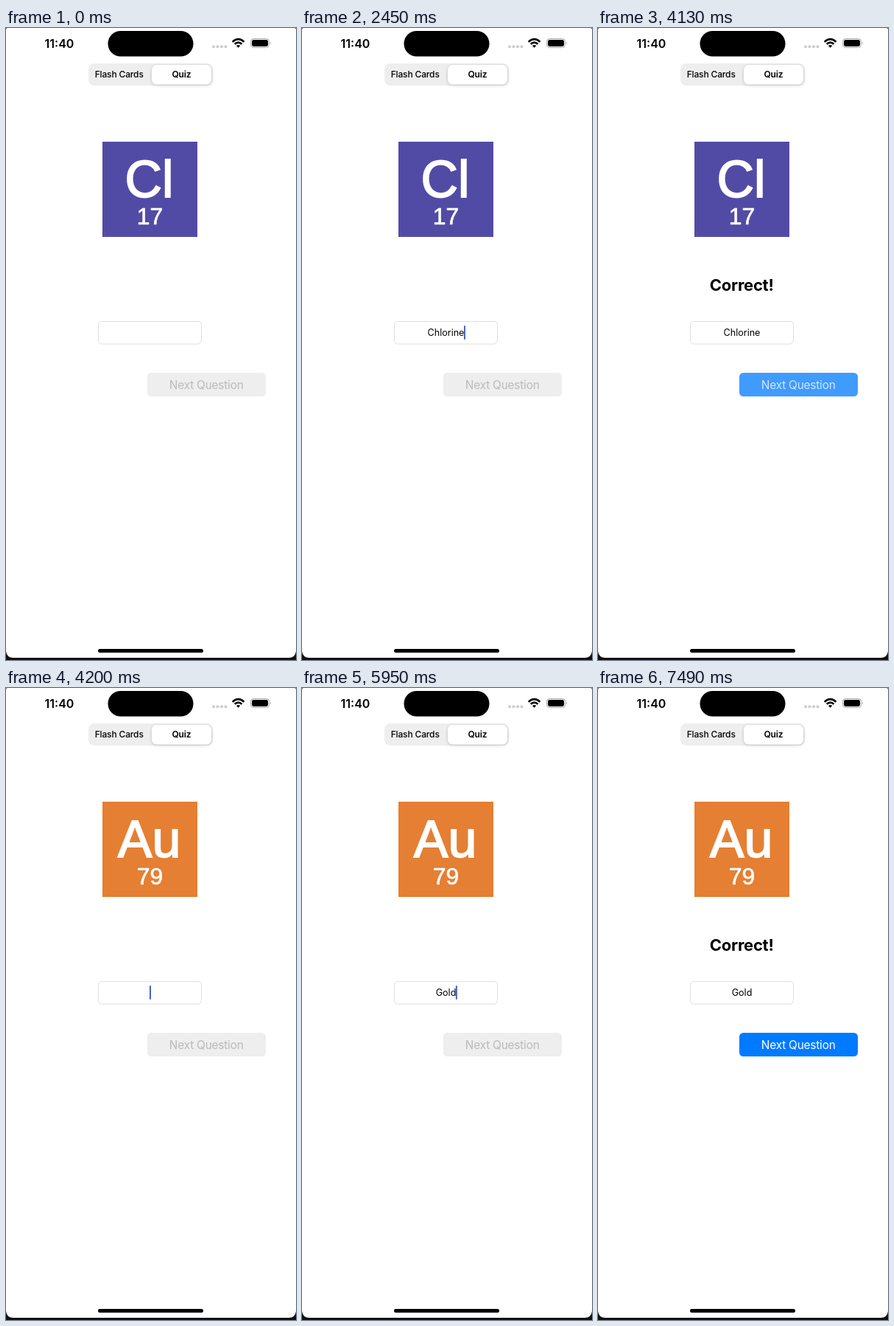
An HTML page for the animation above (8000 ms loop, 394 by 856 pixels).

```html
<!DOCTYPE html>
<html lang="en">
<head>
<meta charset="utf-8">
<title>Element quiz</title>
<style>
  html, body { margin: 0; width: 100%; height: 100%; overflow: hidden; background: #111; }
  svg { display: block; width: 394px; height: 856px; }
  text { font-family: Inter, sans-serif; text-anchor: middle; }
  .tile text {
    font-family: "Liberation Sans", Arial, sans-serif;
    fill: #fff; stroke: #fff;
  }
  #symbol { font-size: 70px; stroke-width: 1.8px; }
  #number { font-size: 32px; stroke-width: .7px; }
  .tab { font-size: 12px; letter-spacing: -.15px; }
</style>
</head>
<body>
<svg viewBox="0 0 394 856">
  <path d="M0 2Q0 0 2 0H392Q394 0 394 2V844Q393 853 384 853H10Q1 853 0 844Z" fill="#fff"/>

  <!-- Status bar -->
  <text x="72.5" y="27" font-size="16" font-weight="600">11:40</text>
  <rect x="138.5" y="4" width="116" height="34.5" rx="17.2"/>
  <g fill="#ccc">
    <circle cx="282" cy="25.3" r="2"/><circle cx="287.5" cy="25.3" r="2"/>
    <circle cx="293" cy="25.3" r="2"/><circle cx="298.5" cy="25.3" r="2"/>
  </g>
  <g fill="none" stroke="#000" stroke-width="2.5">
    <path d="M307.7 18.8Q315.6 11.4 323.5 18.8"/>
    <path d="M310.7 21.8Q315.6 17.4 320.5 21.8"/>
  </g>
  <path d="M313 24.1Q315.6 22 318.2 24.1L315.6 26.8Z"/>
  <rect x="332.5" y="14.5" width="25" height="12" rx="3.8" fill="#fff" stroke="#a6a6a6"/>
  <rect x="334" y="16" width="22" height="9" rx="2.4"/>
  <path d="M359 18.6Q361 20.5 359 22.4Z" fill="#a6a6a6"/>

  <!-- Tabs -->
  <rect x="112" y="48" width="169" height="30" rx="8" fill="#eeeeef"/>
  <rect x="198" y="50" width="81" height="26.5" rx="6.5" fill="#fff"
        style="filter: drop-shadow(0 1.5px 2px #0003)"/>
  <text class="tab" x="153.7" y="67.4" font-weight="500">Flash Cards</text>
  <text class="tab" x="238.4" y="67.4" font-weight="600">Quiz</text>

  <!-- Question -->
  <g class="tile">
    <rect id="tile" x="131" y="154" width="129" height="129"/>
    <text id="symbol" x="194.5" y="229"></text>
    <text id="number" x="195.5" y="266"></text>
  </g>
  <text id="verdict" x="195.2" y="356" font-size="22" font-weight="700" letter-spacing="-.25">Correct!</text>

  <!-- Answer -->
  <rect x="125.5" y="397.5" width="140" height="30.5" rx="5" fill="#fff" stroke="#dedede"/>
  <text id="answer" x="195.5" y="417" font-size="12.6"></text>
  <rect id="caret" y="403" width="2" height="19" rx="1" fill="#4464cc"/>
  <rect id="button" x="192" y="467" width="161" height="32" rx="5.5"/>
  <text id="label" x="272.2" y="489" font-size="15.4" letter-spacing="-.2">Next Question</text>

  <rect x="125" y="841" width="143" height="5" rx="2.5"/>
</svg>
<script>
const LOOP = 8000, STEP = 70;
const $ = id => document.getElementById(id);

const questions = [
  { start: 0, symbol: "Cl", number: 17, color: "#524ba5", name: "Chlorine",
    typed: [[560, 1], [770, 2], [1890, 4], [2100, 5], [2170, 6], [2310, 7], [2450, 8]],
    correct: 2660, pressed: 4130 },
  { start: 4200, symbol: "Au", number: 79, color: "#e57f33", name: "Gold",
    typed: [[5460, 1], [5600, 2], [5880, 3], [5950, 4]],
    correct: 7490, pressed: Infinity },
];

// Caret opacity as [time, value], linear between points
const blink = [
  [0, 0], [210, 0], [350, 1], [1260, 1], [1470, 0], [1820, 0], [1890, 1],
  [4760, 1], [4900, 0], [5110, 0], [5250, 1],
  [6370, 1], [6650, 0], [6790, 0], [7000, 1], [LOOP, 1],
];

const buttonStyles = {
  disabled: ["#eeeeee", "#bababa"],
  pressed: ["#409bff", "#cfe6ff"],
  enabled: ["#007aff", "#ffffff"],
};

function interpolate(points, t) {
  const i = points.findIndex(([time]) => time > t);
  const [t0, v0] = points[i - 1], [t1, v1] = points[i];
  return v0 + (v1 - v0) * (t - t0) / (t1 - t0);
}

function render(now) {
  const t = Math.floor(now % LOOP / STEP) * STEP;
  const q = questions.findLast(question => t >= question.start);
  const length = q.typed.findLast(([time]) => t >= time)?.[1] ?? 0;
  const correct = t >= q.correct;

  $("tile").setAttribute("fill", q.color);
  $("symbol").textContent = q.symbol;
  $("number").textContent = q.number;
  $("answer").textContent = q.name.slice(0, length);
  $("verdict").style.opacity = correct ? 1 : 0;

  const width = length ? $("answer").getComputedTextLength() : 0;
  $("caret").setAttribute("x", 195 + width / 2);
  $("caret").style.opacity = correct ? 0 : interpolate(blink, t);

  const state = !correct ? "disabled" : t >= q.pressed ? "pressed" : "enabled";
  const [fill, ink] = buttonStyles[state];
  $("button").setAttribute("fill", fill);
  $("label").setAttribute("fill", ink);
}

const begin = performance.now();
function tick() {
  render(performance.now() - begin);
  requestAnimationFrame(tick);
}
tick();
</script>
</body>
</html>
```
